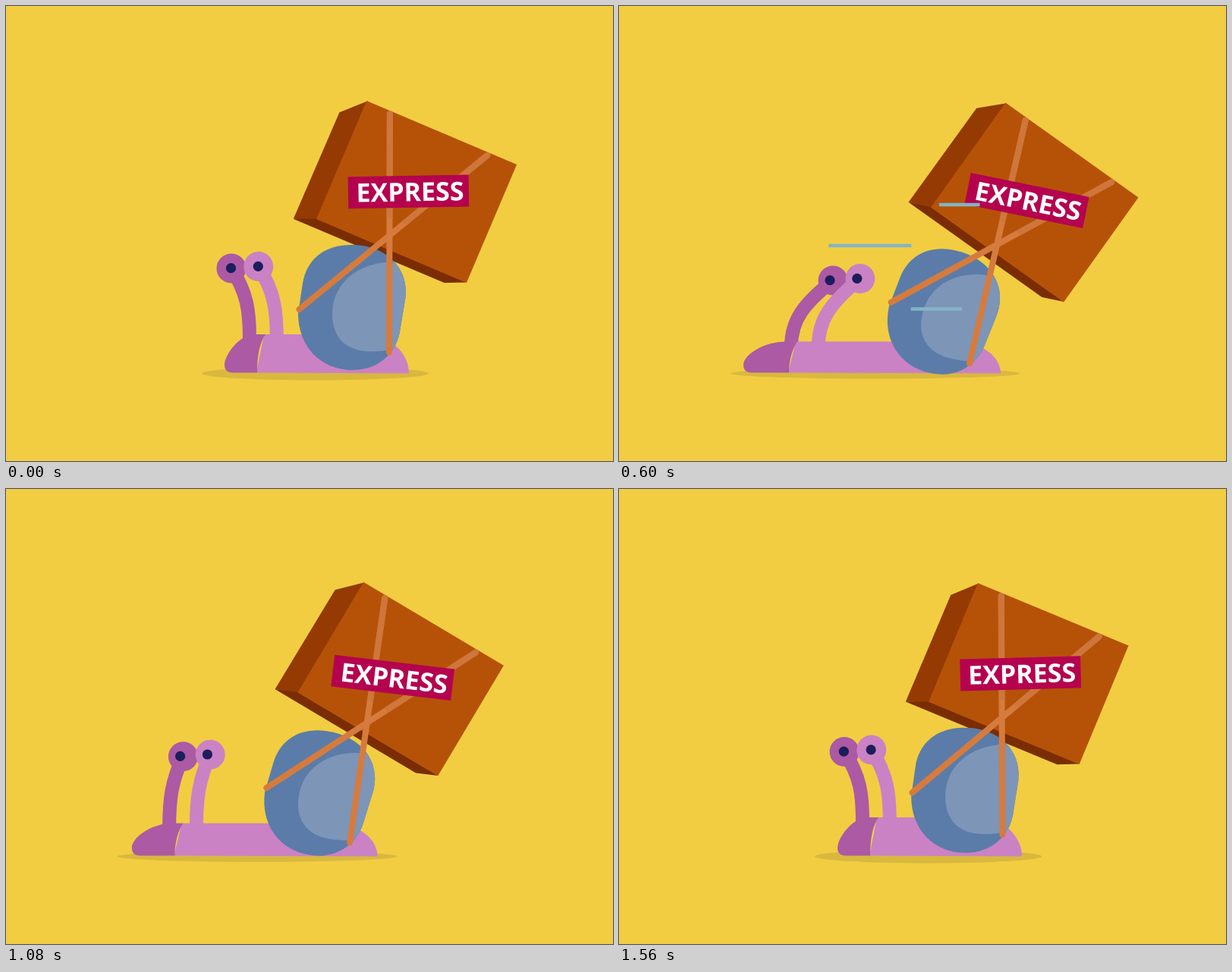
Recreate the animation shown at these times as an HTML page with a canvas. Size 800x600 px, loop 1600 ms.

```html
<!DOCTYPE html>
<html lang="en">
<head>
<meta charset="utf-8">
<title>Express snail</title>
<style>
  html, body { margin: 0; width: 100%; height: 100%; overflow: hidden; background: #f2cd42; }
  canvas { display: block; }
</style>
</head>
<body>
<canvas id="stage" width="800" height="600"></canvas>
<script>
const ctx = document.getElementById('stage').getContext('2d');
const LOOP = 1600, STEP = 40;
const RAD = Math.PI / 180;
const FLOOR = 483.5;

const colors = {
  sky: '#f2cd42', shadow: '#d9b83f',
  skin: '#ca82c4', skinDark: '#ab5aa3', pupil: '#1b1d5c',
  shell: '#5b7ca8', shellLight: '#7d95b7',
  front: '#b65208', side: '#943a02', under: '#7a2d02',
  strap: '#d67b3e', strapFar: '#ce763b',
  label: '#b5024f', dash: '#82b4c6'
};

// Monotone cubic interpolation through (times, values).
function curve(times, values) {
  const n = times.length;
  const slope = times.slice(1).map((x, i) => (values[i + 1] - values[i]) / (x - times[i]));
  const tangent = times.map((_, i) => {
    if (i === 0 || i === n - 1) return 0;
    const a = slope[i - 1], b = slope[i];
    return a * b <= 0 ? 0 : 2 * a * b / (a + b);
  });
  return t => {
    if (t <= times[0]) return values[0];
    if (t >= times[n - 1]) return values[n - 1];
    let i = 0;
    while (t > times[i + 1]) i++;
    const h = times[i + 1] - times[i], u = (t - times[i]) / h, v = 1 - u;
    return values[i] * v * v * (1 + 2 * u) + values[i + 1] * u * u * (3 - 2 * u)
      + h * u * v * (tangent[i] * v - tangent[i + 1] * u);
  };
}

const KEY_TIMES = [0, 320, 480, 600, 760, 920, 1060, 1200, 1380, 1560, LOOP];
const track = (...values) => curve(KEY_TIMES, [...values, values[0]]);

const tracks = {
  head: track(288, 304, 213, 164, 150, 152, 163, 195, 259, 288),
  neck: track(43, 41, 58, 60, 60, 59, 57, 54, 46, 43),
  top: track(433, 429, 440, 442.5, 443, 442, 441, 439, 435, 433),
  tail: track(531, 535, 532.5, 503, 490.5, 487, 489, 497.5, 522, 531),
  shadowGap: track(30, 28, 15, 17, 20, 18, 19, 21, 27, 30),
  stalk: track(-10, -7, 7, 3, -2, -4, -7, -9, -10, -10),
  bend: track(-3, 20, 14, 17, 18, 11, 4, -2, -4, -3),
  eyeX: track(-24, -13, 43, 55, 56, 32, 20, 8, -12, -24),
  eyeY: track(346, 356, 361, 362, 361, 356, 353, 351, 348, 346.5),
  look: track(-0.5, -1, 1.5, -4, -7.5, -5.3, -4, -2.6, -1, -0.7),
  shell: track(456, 459, 452, 427, 416.5, 413.5, 412.5, 415, 443, 456),
  tilt: track(0, -3.3, 5.4, 12.5, 15.9, 15.7, 9, 0.4, -1.2, -0.5),
  lift: track(272.5, 272, 276, 287, 294.3, 294.3, 285, 277, 273, 273)
};

const dashFront = curve([440, 480, 760, 920, 960], [0, 0.1, 0.808, 1, 1.02]);
const dashBack = curve([480, 760, 920, 960], [0, 0.555, 0.916, 1.02]);
const dashes = [[391, 588, 262], [214, 613, 316], [346, 593, 399.5]];

function fillPoly(color, ...points) {
  ctx.fillStyle = color;
  ctx.beginPath();
  points.forEach(p => ctx.lineTo(...p));
  ctx.fill();
}

function fillEllipse(color, x, y, rx, ry = rx) {
  ctx.fillStyle = color;
  ctx.beginPath();
  ctx.ellipse(x, y, rx, ry, 0, 0, 2 * Math.PI);
  ctx.fill();
}

function line(color, width, cap, from, to) {
  ctx.strokeStyle = color;
  ctx.lineWidth = width;
  ctx.lineCap = cap;
  ctx.beginPath();
  ctx.moveTo(...from);
  ctx.lineTo(...to);
  ctx.stroke();
}

function inFrame(frame, draw) {
  ctx.save();
  ctx.translate(frame.x, frame.y);
  ctx.rotate(frame.angle);
  draw();
  ctx.restore();
}

function toStage(frame, [x, y]) {
  const c = Math.cos(frame.angle), s = Math.sin(frame.angle);
  return [frame.x + x * c - y * s, frame.y + x * s + y * c];
}

function drawShadow(p) {
  const left = p.head - p.shadowGap, right = p.tail + 26;
  const rx = (right - left) / 2;
  fillEllipse(colors.shadow, left + rx, 484.5, rx, 1341 / rx);
}

function drawStalk(p, color, dx, dy) {
  const base = p.head + p.neck + p.stalk + dx;
  const eyeX = base + p.eyeX, eyeY = p.eyeY + dy;
  const bottom = p.top + 6, height = bottom - eyeY;
  ctx.strokeStyle = color;
  ctx.lineWidth = 18;
  ctx.lineCap = 'butt';
  ctx.beginPath();
  ctx.moveTo(base, bottom);
  ctx.bezierCurveTo(base, bottom - height * 0.4, base + p.bend, eyeY + height * 0.35, eyeX, eyeY);
  ctx.stroke();
  fillEllipse(color, eyeX, eyeY, 19.5);
  fillEllipse(colors.pupil, eyeX + p.look, eyeY - 0.3, 6.6);
}

function drawBody(p) {
  const { head, neck, top, tail } = p;
  const split = head + neck;
  ctx.fillStyle = colors.skin;
  ctx.beginPath();
  ctx.moveTo(split - 1, FLOOR);
  ctx.lineTo(split + 9, top);
  ctx.lineTo(tail - 60, top);
  ctx.ellipse(tail - 60, FLOOR + 1, 60, FLOOR + 1 - top, 0, -Math.PI / 2, 0);
  ctx.fill();

  ctx.fillStyle = colors.skinDark;
  ctx.beginPath();
  ctx.moveTo(split, FLOOR);
  ctx.lineTo(head + 11, FLOOR);
  ctx.bezierCurveTo(head + 3, FLOOR, head, FLOOR - 4, head, FLOOR - 11);
  ctx.bezierCurveTo(head + 1, FLOOR - 24, head + neck * 0.45, top, head + neck * 0.95, top);
  ctx.lineTo(split + 11, top);
  ctx.bezierCurveTo(split + 4, top + 10, split, top + 26, split, FLOOR);
  ctx.fill();
}

function drawShell(frame) {
  inFrame(frame, () => {
    ctx.fillStyle = colors.shell;
    ctx.beginPath();
    ctx.moveTo(-71, 8);
    ctx.bezierCurveTo(-71, 51, -42, 82.5, 1, 82.5);
    ctx.bezierCurveTo(34, 82.5, 58, 61, 63, 32);
    ctx.lineTo(70.5, -13);
    ctx.bezierCurveTo(75, -53, 44, -82.5, -1, -82.5);
    ctx.bezierCurveTo(-38, -82.5, -60, -62, -65, -32);
    ctx.closePath();
    ctx.fill();
    ctx.clip();

    ctx.fillStyle = colors.shellLight;
    ctx.beginPath();
    ctx.moveTo(80, -61);
    ctx.lineTo(52, -60);
    ctx.bezierCurveTo(8, -59, -26, -32, -26, 9);
    ctx.bezierCurveTo(-26, 41, -6, 58, 24, 58);
    ctx.bezierCurveTo(42, 58, 54, 56, 80, 48);
    ctx.fill();
  });
}

function drawBox(frame) {
  inFrame(frame, () => {
    fillPoly(colors.side, [1, 0], [-27, 28], [-28, 181], [1, 170]);
    fillPoly(colors.under, [-28, 181], [0, 169], [215, 169], [188, 181]);
    fillPoly(colors.front, [0, 0], [215, 0], [215, 169.5], [0, 169.5]);
  });
}

function drawStraps(box, shell) {
  const straps = [[[35, 4], [49, 59]], [[174.5, 4], [-69.5, 2.5]]];
  const lines = straps.map(([top, end]) => [toStage(box, top), toStage(shell, end)]);
  lines.forEach(([from, to]) => line(colors.strap, 8, 'round', from, to));
  ctx.save();
  ctx.beginPath();
  [[-5, -5], [220, -5], [220, 130], [-5, 130]].forEach(p => ctx.lineTo(...toStage(box, p)));
  ctx.clip();
  lines.forEach(([from, to]) => line(colors.strapFar, 8, 'round', from, to));
  ctx.restore();
}

function drawLabel(box) {
  const [x, y] = toStage(box, [97.6, 88.7]);
  inFrame({ x, y, angle: box.angle - 24 * RAD }, () => {
    ctx.fillStyle = colors.label;
    ctx.fillRect(-79.5, -21, 159, 42);
    ctx.fillStyle = '#fff';
    ctx.font = '700 34px "Open Sans", sans-serif';
    ctx.textAlign = 'center';
    ctx.textBaseline = 'alphabetic';
    ctx.fillText('EXPRESS', 2, 12.6);
  });
}

function drawDashes(t) {
  if (t <= 440 || t >= 960) return;
  const back = dashBack(t), front = dashFront(t);
  dashes.forEach(([x0, x1, y]) => {
    const at = f => [x0 + (x1 - x0) * f, y];
    line(colors.dash, 4.6, 'butt', at(back), at(front));
  });
}

function drawScene(t) {
  const p = {};
  for (const name in tracks) p[name] = tracks[name](t);
  const shell = { x: p.shell, y: 397.5 + p.tilt * 0.46, angle: p.tilt * RAD };
  const [x, y] = toStage(shell, [19.2 + (p.lift - 272) * 0.11, -p.lift]);
  const box = { x, y, angle: shell.angle + 23 * RAD };

  ctx.fillStyle = colors.sky;
  ctx.fillRect(0, 0, 800, 600);
  drawShadow(p);
  drawStalk(p, colors.skinDark, 0, 0);
  drawStalk(p, colors.skin, 35.8, -2.4);
  drawBody(p);
  drawBox(box);
  drawShell(shell);
  drawStraps(box, shell);
  drawLabel(box);
  drawDashes(t);
}

const start = performance.now();
function tick() {
  const t = (performance.now() - start) % LOOP;
  drawScene(Math.floor(t / STEP) * STEP);
  requestAnimationFrame(tick);
}
tick();
</script>
</body>
</html>
```
